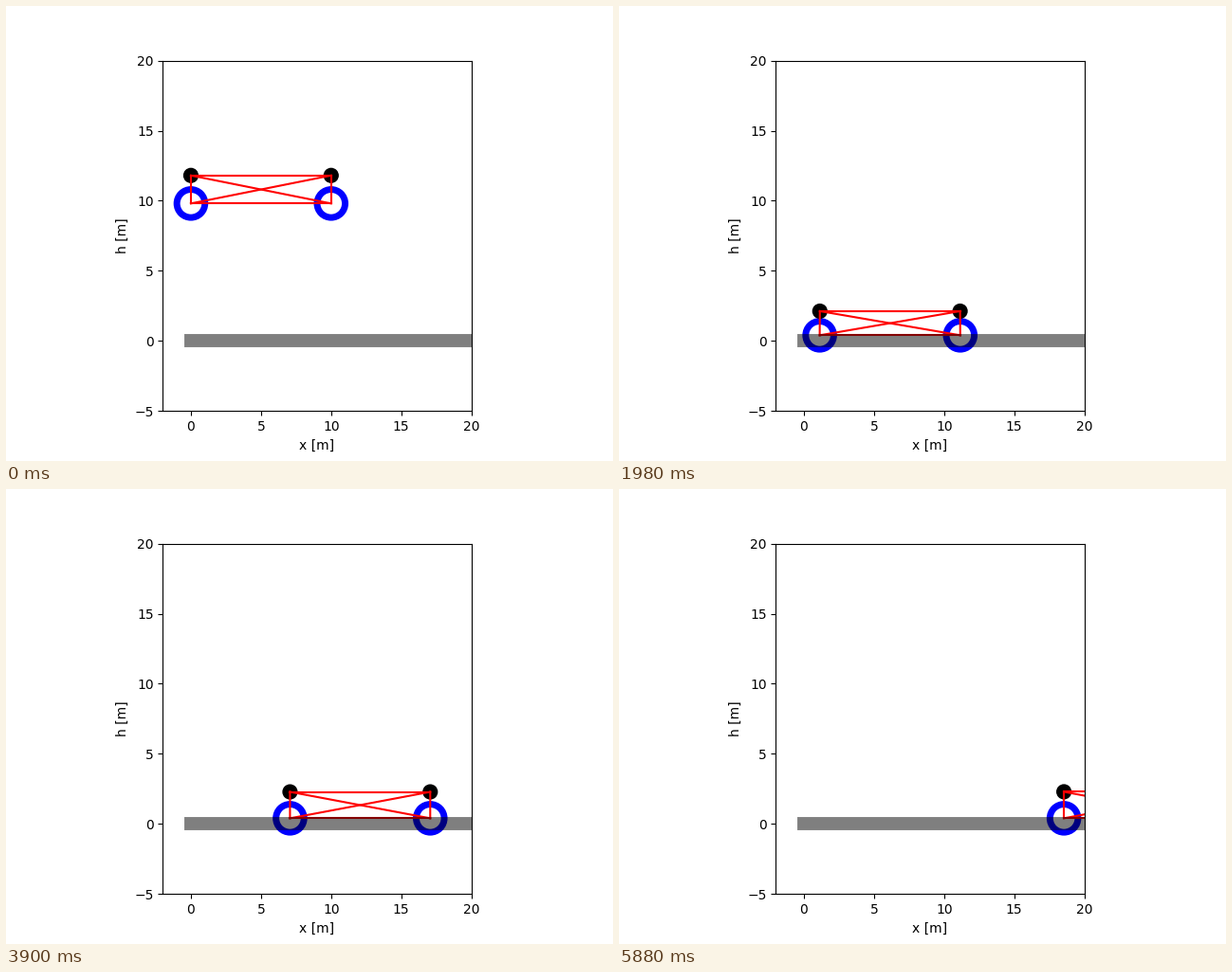
Recreate the animation shown at these times as a matplotlib script. Size 640x480 px, loop 5.94 s.

```python
from itertools import combinations

import numpy as np
import matplotlib.pyplot as plt
from matplotlib.animation import FuncAnimation
from matplotlib.patches import Circle

FRAMES, INTERVAL = 99, 60
DT = 0.1              # simulated seconds per frame
G = 9.81
LENGTH, HEIGHT = 10, 2
LANDING = 12          # first step on the ground
WHEEL_H, REST_H = 0.4, 2.29
OMEGA, DAMPING = 9.83, 1.0


def pose(i):
    """Corner positions: rear wheel, front wheel, rear mass, front mass."""
    if i < LANDING:
        h = 10 - G / 2 * (i * DT + 0.2) ** 2
        return [(0, h), (LENGTH, h), (0, h + HEIGHT), (LENGTH, h + HEIGHT)]
    t = (i - LANDING) * DT
    x = 0.25 * t**2 + 0.003 * t + 0.03
    bounce = -1.4 * np.exp(-DAMPING * t) * np.sin(OMEGA * t - 0.07)
    spread = -0.07 * bounce   # squeezed diagonals push the wheels apart
    top = REST_H + bounce
    return [(x - spread, WHEEL_H), (x + LENGTH + spread, WHEEL_H),
            (x, top), (x + LENGTH, top)]


fig, ax = plt.subplots(figsize=(6.4, 4.8), dpi=100)
ax.set_aspect("equal")
ax.set_xlim(-2, 20)
ax.set_ylim(-5, 20)
ax.set_xticks(range(0, 21, 5))
ax.set_yticks(range(-5, 21, 5))
ax.set_xlabel("x [m]")
ax.set_ylabel("h [m]")

wheels = [Circle((0, 0), 1, fill=False, ec="b", lw=5) for _ in range(2)]
masses = [Circle((0, 0), 0.5, color="k", lw=1) for _ in range(2)]
nodes = wheels + masses
for node in nodes:
    ax.add_patch(node)

pairs = list(combinations(range(4), 2))
springs = [ax.plot([], [], "r", lw=1.5)[0] for _ in pairs]
ax.plot([0, 40], [0, 0], "k", lw=10, alpha=0.5)


def update(i):
    points = pose(i)
    for node, point in zip(nodes, points):
        node.center = point
    for spring, (a, b) in zip(springs, pairs):
        spring.set_data(*zip(points[a], points[b]))
    return nodes + springs


anim = FuncAnimation(fig, update, frames=FRAMES, interval=INTERVAL,
                     repeat=True, repeat_delay=0, blit=False)
plt.show()
```
